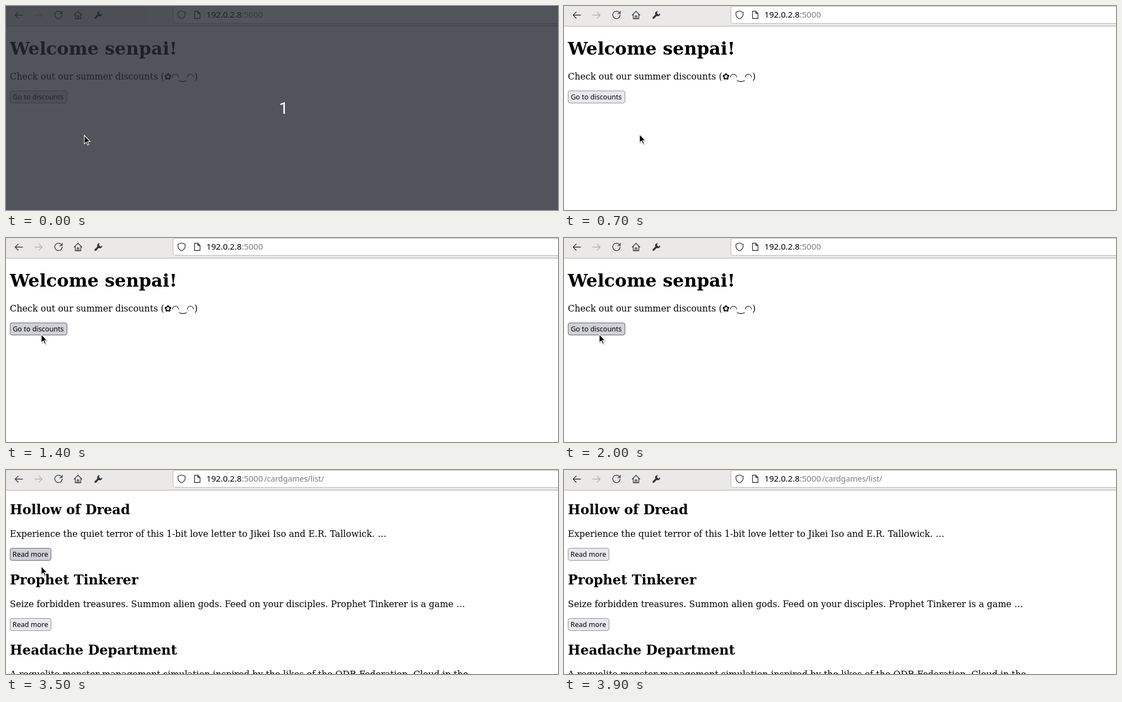
These frames come from a looping animation (1000 px wide and 369 px high, 4100 ms). An HTML page:

```html
<!DOCTYPE html>
<html lang="en">
<head>
<meta charset="utf-8">
<title>Discount shop</title>
<style>
  html, body { margin: 0; width: 100%; height: 100%; overflow: hidden; background: #fff; }
  svg { display: block; width: 100%; height: 100%; }
  text { white-space: pre; font: 16px "DejaVu Serif", "DejaVu Sans", serif; }
  .h1 { font-size: 32px; font-weight: bold; }
  .h2 { font-size: 24px; font-weight: bold; }
  .label { font: 12.6px "Noto Sans", sans-serif; }
  .url { font: 15.1px "Noto Sans", sans-serif; }
  .path { font-size: 14.2px; }
  .count { font: 30px Roboto, sans-serif; fill: #fff; }
  .button { fill: #e9e9ed; stroke: #8f8f9d; }
  .icons { fill: none; stroke: #2e3436; stroke-width: 1.3; stroke-linejoin: round; stroke-linecap: round; }
</style>
</head>
<body>
<svg viewBox="0 0 1000 369">
  <rect width="1000" height="369" fill="#fff"/>

  <g id="toolbar">
    <rect width="1000" height="36" fill="#ebe9e8"/>
    <path d="M0 36.5H1000" stroke="#b1afad"/>
    <rect x="302.5" y=".5" width="720" height="31" rx="4" fill="#fff" stroke="#b8b6b4"/>
    <g class="icons">
      <path d="M30 16.5H16.5M22 11L16.5 16.5L22 22"/>
      <path d="M52 16.5H65.5M60 11L65.5 16.5L60 22" stroke="#b3b2b1"/>
      <path d="M100.6 12.4A6.7 6.7 0 1 0 101.7 16.5M101.8 9.5V13.8H97.4"/>
      <path d="M123.5 16.5L130.5 9.5L137.5 16.5M125.5 15V23H135.5V15M129 23V18H132V23"/>
      <path d="M162 21.5L168 15.5" stroke-width="3.4"/>
      <path d="M169.2 9.6A4.3 4.3 0 1 0 174 14.2L171 15.8L168 13.2Z" fill="#2e3436" stroke-width=".6"/>
      <path d="M318 9L324.5 11.3V14.5C324.5 19 321.5 21.8 318 23.5C314.5 21.8 311.5 19 311.5 14.5V11.3Z"/>
      <path d="M341.5 9.5H347.5L351.5 13.5V22.5H341.5ZM347.5 9.5V13.5H351.5"/>
    </g>
    <text class="url" x="363" y="21">192.0.2.8<tspan fill="#7b7b7b">:5000</tspan></text>
  </g>

  <g id="welcome">
    <text class="h1" x="7" y="88">Welcome senpai!</text>
    <text x="7" y="133">Check out our summer discounts (✿◠‿◠)</text>
    <rect id="go" class="button" x="7.5" y="153.5" width="103" height="22" rx="3.5"/>
    <text class="label" x="12.2" y="169">Go to discounts</text>
  </g>

  <g id="list" opacity="0">
    <text class="url path" x="467.5" y="21" fill="#7b7b7b">/cardgames/list/</text>
  </g>

  <g id="countdown">
    <rect width="1000" height="369" fill="#272a33" fill-opacity=".8"/>
    <text class="count" x="494.5" y="195">1</text>
  </g>

  <g id="cursor">
    <path d="M1.2 1.5V16.8L4.7 13.6L7.3 19.2L9.6 18.1L7.1 12.7H11.8Z" transform="translate(.6 .8)"
      fill="none" stroke="#000" stroke-opacity=".18" stroke-width="1.6"/>
    <path d="M.9 1V16.5L4.5 13.2L7 18.8L9.3 17.7L6.8 12.3H11.5Z" stroke="#fff" stroke-width="1.1"/>
  </g>
</svg>

<script>
const LOOP = 4100;
const byId = id => document.getElementById(id);

const games = [
  ["Hollow of Dread",
    "Experience the quiet terror of this 1-bit love letter to Jikei Iso and E.R. Tallowick. …"],
  ["Prophet Tinkerer",
    "Seize forbidden treasures. Summon alien gods. Feed on your disciples. Prophet Tinkerer is a game …"],
  ["Headache Department",
    "A roguelite monster management simulation inspired by the likes of the ODR Federation, Cloud in the"]
];

byId("list").insertAdjacentHTML("beforeend", games.map(([title, blurb], i) => `
  <g transform="translate(0 ${i * 127})">
    <text class="h2" x="7" y="80">${title}</text>
    <text x="7" y="121">${blurb}</text>
    <rect class="button" x="7.5" y="141.5" width="74" height="22" rx="3.5"/>
    <text class="label" x="11.8" y="157">Read more</text>
  </g>`).join(""));

// Each step [ms, style] holds until the next one.
function hold(element, steps) {
  const frames = steps.map(([ms, style]) => ({ ...style, offset: ms / LOOP, easing: "steps(1, end)" }));
  frames.push({ ...steps.at(-1)[1], offset: 1 });
  element.animate(frames, { duration: LOOP, iterations: Infinity });
}

const shown = { opacity: 1 };
const hidden = { opacity: 0 };
const idle = { fill: "#e9e9ed", stroke: "#8f8f9d" };
const hover = { fill: "#d0d0d7", stroke: "#676774" };
const pressed = { fill: "#b1b1b9", stroke: "#484851" };
const at = (x, y, opacity = 1) => ({ transform: `translate(${x}px, ${y}px)`, opacity });

hold(byId("countdown"), [[0, shown], [100, hidden]]);
hold(byId("welcome"), [[0, shown], [2300, hidden]]);
hold(byId("list"), [[0, hidden], [2300, shown]]);
hold(byId("go"), [[0, idle], [1200, hover], [1800, pressed], [2000, hover]]);
hold(byId("list").querySelector(".button"), [[0, idle], [3500, hover], [3600, idle]]);
hold(byId("cursor"), [
  [0, at(141, 233)],
  [700, at(136, 231)],
  [800, at(116, 222)],
  [900, at(91, 209)],
  [1000, at(71, 198)],
  [1100, at(65, 187)],
  [1200, at(63, 175)],
  [1300, at(63, 171)],
  [1400, at(63, 173)],
  [3600, at(67, 90)],
  [3700, at(71, 5)],
  [3900, at(71, 5, 0)]
]);
</script>
</body>
</html>
```
